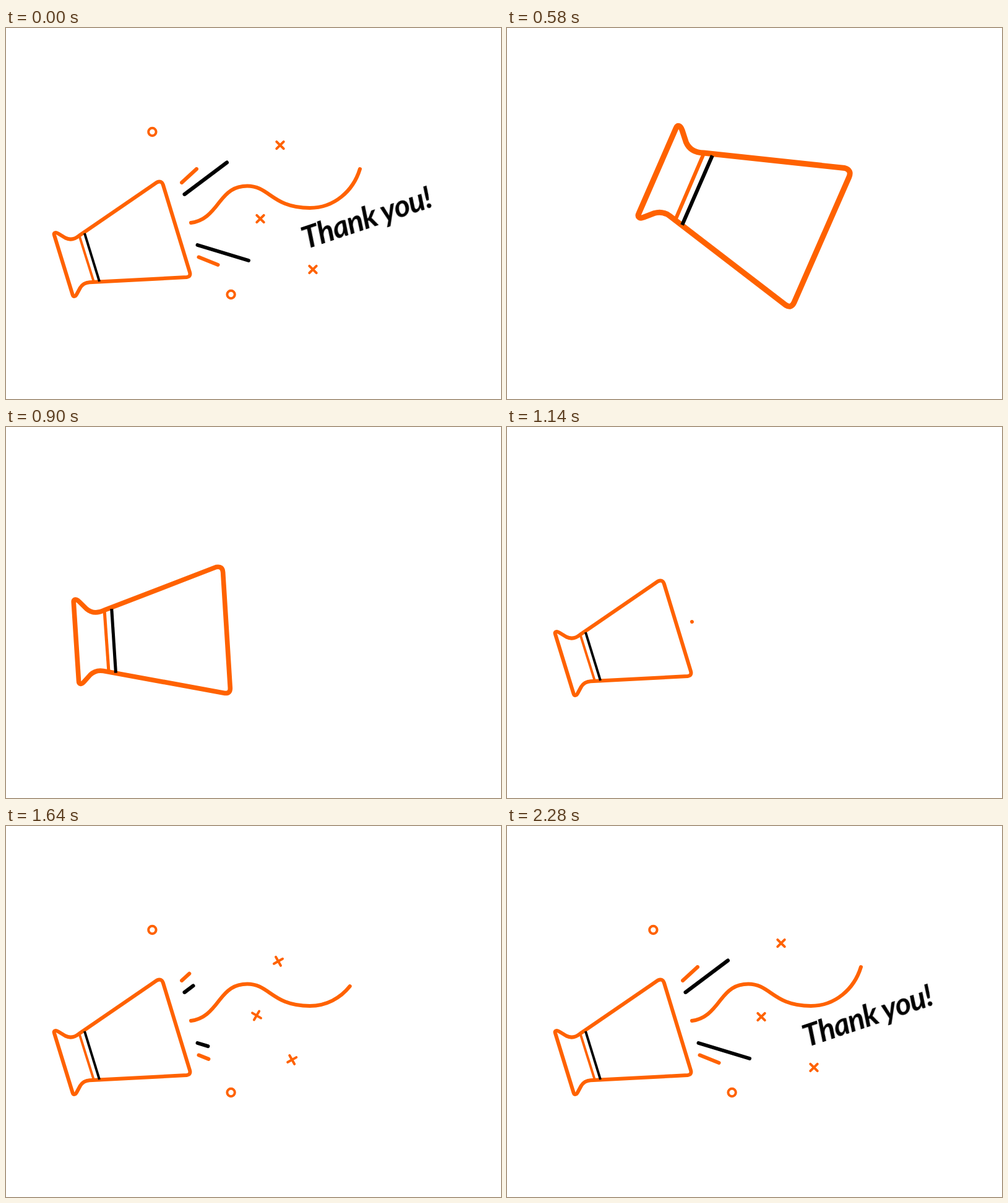
Recreate the animation shown at these times as an HTML page without scripts. Size 800 by 600 pixels, loop 3200 ms.

```html
<!DOCTYPE html>
<html lang="en">
<head>
<meta charset="utf-8">
<title>Thank you</title>
<style>
  html, body { margin: 0; width: 100%; height: 100%; overflow: hidden; background: #fff; }
  svg { display: block; width: 100%; height: 100%; }

  /* The cycle begins at the blank stage; the page opens on its last 100 ms. */
  .horn, .wave, .ray, .ring, .cross, text {
    animation: 3200ms linear -3100ms infinite;
  }
  .ink { fill: none; stroke: #ff6200; stroke-width: 6; stroke-linecap: round; }
  .dark { stroke: #000; }
  .band { stroke-width: 4; stroke-linecap: butt; }
  .small { stroke-width: 4; }

  .horn { transform-origin: 188px 342px; animation-name: grow, turn, travel; }
  .wave { stroke-dasharray: 1 2; animation-name: wave, show-wave; }
  .ray { stroke-dasharray: 1 2; animation-name: long, show-ray; }
  .ray.short { animation-name: short, show-ray; }
  .ring { animation-name: burst; }
  .cross { animation-name: drift; }
  text {
    font: italic 700 49px Lato, "Open Sans", sans-serif;
    letter-spacing: -1px;
    animation-name: fade;
  }

  @keyframes grow {
    0%, 10.625% { scale: 0; }
    15%, 21.875% { scale: 1.5; }
    28.75%, 100% { scale: 1; }
  }
  @keyframes turn {
    0%, 10.625% { rotate: 24.75deg; }
    16.25% { rotate: 45deg; }
    28.75%, 100% { rotate: 0deg; }
  }
  @keyframes travel {
    0%, 10.625% { translate: 269px -85.7px; }
    28.75%, 100% { translate: 0px 0px; }
  }
  @keyframes wave {
    0% { stroke-dasharray: 0 2; }
    32.5% { stroke-dasharray: 0 2; animation-timing-function: cubic-bezier(.333, 0, .667, .333); }
    49.06%, 100% { stroke-dasharray: 1 2; }
  }
  @keyframes show-wave {
    0%, 32.4% { opacity: 0; }
    32.45%, 100% { opacity: 1; }
  }
  @keyframes long {
    0%, 46.875% { stroke-dasharray: 0 2; }
    53.125%, 100% { stroke-dasharray: 1 2; }
  }
  @keyframes short {
    0%, 46.875% { stroke-dasharray: 0 2; }
    49.375%, 100% { stroke-dasharray: 1 2; }
  }
  @keyframes show-ray {
    0%, 46.8% { opacity: 0; }
    46.85%, 100% { opacity: 1; }
  }
  @keyframes burst {
    0%, 41.25% { translate: var(--from); scale: 0; }
    43% { scale: 1; }
    45.625%, 100% { translate: 0px 0px; scale: 1; }
  }
  @keyframes drift {
    0%, 38.125% { translate: var(--from); rotate: var(--spin); scale: 0; }
    41.25% { scale: 1; }
    53.125%, 100% { translate: 0px 0px; rotate: 0deg; scale: 1; }
  }
  @keyframes fade {
    0%, 61.25% { opacity: 0; }
    68.125%, 100% { opacity: 1; }
  }
</style>
</head>
<body>
<svg viewBox="0 0 800 600">
  <defs>
    <path id="x" class="ink small" d="M-5.7-5.7 5.7 5.7M5.7-5.7-5.7 5.7"/>
    <circle id="o" class="ink small" r="6.2"/>
  </defs>

  <g class="horn">
    <path class="ink band" d="M118.5 336 142 411"/>
    <path class="ink" stroke-linejoin="round" d="M78 335 107.5 431C108.5 435 112 435 114 431L120 420
      Q125 412 135 411.3L292 403Q299 402 297 395L254 254Q251.5 246 244 249.5
      L118 336Q107 345 96 339.5L84.5 332.5C80 330 76.5 331 78 335Z"/>
    <path class="ink band dark" d="M127 332 151 410"/>
  </g>

  <path class="ink wave" pathLength="1" d="M299 315C320 312 331 300 345 281.5
    C357 266 368 255.5 390 255.5C426 255.5 430 291 491 291C530 291 561 264 572 228"/>

  <path class="ink ray short" pathLength="1" d="M284 250 308 228"/>
  <path class="ink ray dark" pathLength="1" d="M288.5 269 357 217.5"/>
  <path class="ink ray dark" pathLength="1" d="M309.5 351 392 376"/>
  <path class="ink ray short" pathLength="1" d="M311.5 370.5 342.5 383"/>

  <g transform="translate(236.4 168)"><use href="#o" class="ring" style="--from: 39px 162px"/></g>
  <g transform="translate(363.6 431)"><use href="#o" class="ring" style="--from: -88px -101px"/></g>

  <g transform="translate(443 189.5)"><use href="#x" class="cross" style="--from: -9px 88.5px; --spin: 47deg"/></g>
  <g transform="translate(411 308.5)"><use href="#x" class="cross" style="--from: -18px -6px; --spin: -43deg"/></g>
  <g transform="translate(496 390.5)"><use href="#x" class="cross" style="--from: -102px -37.5px; --spin: 47deg"/></g>

  <text transform="translate(484.6 358) rotate(-18.5)">Thank you!</text>
</svg>
</body>
</html>
```
